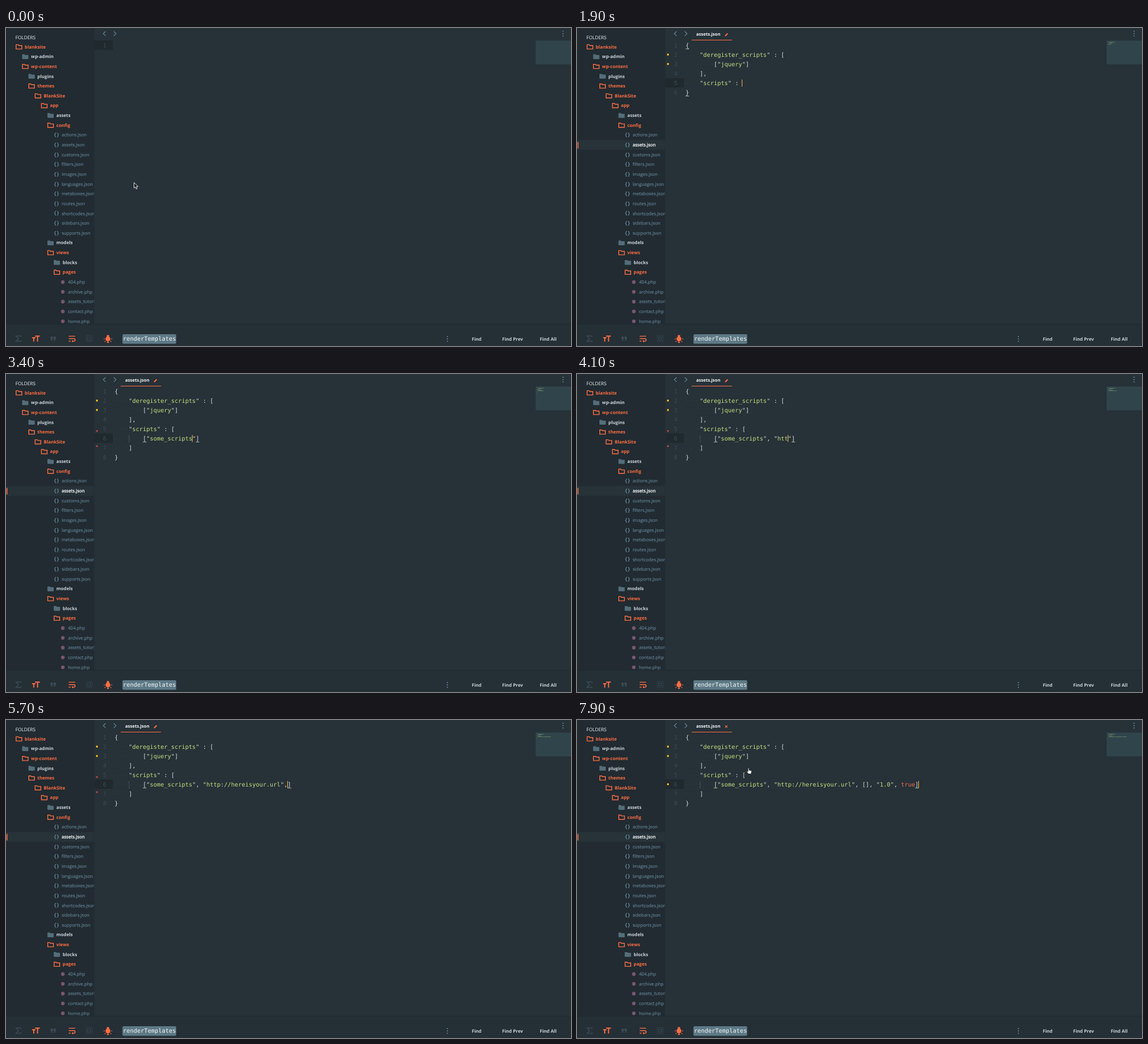
An HTML page that plays this animation: 960 by 540 pixels, repeating every 8000 ms.

```html
<!DOCTYPE html>
<html lang="en">
<head>
<meta charset="utf-8">
<title>Editor typing</title>
<style>
  html, body { margin: 0; width: 100%; height: 100%; overflow: hidden; background: #263138; }
  svg { display: block; width: 960px; height: 540px; }
  text { white-space: pre; text-rendering: geometricPrecision; }
  .ui { font: 7.7px "Open Sans", sans-serif; }
  .bold { font-weight: 700; }
  .code { font: 9.967px "DejaVu Sans Mono", monospace; }
  .brace { font: 700 8.2px "DejaVu Sans Mono", monospace; }
</style>
</head>
<body>
<svg id="stage" viewBox="0 0 960 540" xmlns="http://www.w3.org/2000/svg"></svg>
<script>
const LOOP = 8000, STEP = 100;
const OPEN_AT = 500, CLICK_AT = 750, COMMA_AT = 850, SAVE_AT = 7650;
const ORANGE = '#fc6d43', GREY = '#546e7a', PALE = '#c9d3d8', FILE = '#68899a', BRIGHT = '#f4f7f8';
const CELL = 6, CODE_X = 184.5, LINE = 16, ROW = 16.643;

const stage = document.getElementById('stage');
const clamp = v => Math.max(0, Math.min(1, v));
const rect = (x, y, w, h, fill, more = '') =>
  `<rect x="${x}" y="${y}" width="${w}" height="${h}" fill="${fill}" ${more}/>`;
const path = (d, stroke, width = 1, fill = 'none') =>
  `<path d="${d}" stroke="${stroke}" stroke-width="${width}" fill="${fill}"/>`;
const text = (x, y, s, fill, cls = 'ui', more = '') =>
  `<text x="${x}" y="${y}" fill="${fill}" class="${cls}" ${more}>${s}</text>`;
const at = (x, y, body) => `<g transform="translate(${x} ${y})">${body}</g>`;
const kebab = (x, y) => [-4, 0, 4].map(d =>
  `<circle cx="${x}" cy="${y + d}" r="1.1" fill="#64808d"/>`).join('');

// Tree entries: depth, kind (o open folder, c closed folder, j json, p php), name
const config = 'actions assets customs filters images languages metaboxes routes shortcodes sidebars supports';
const pages = '404 archive assets_tutorial contact home';
const tree = [
  [0, 'o', 'blanksite'], [1, 'c', 'wp-admin'], [1, 'o', 'wp-content'],
  [2, 'c', 'plugins'], [2, 'o', 'themes'], [3, 'o', 'BlankSite'],
  [4, 'o', 'app'], [5, 'c', 'assets'], [5, 'o', 'config'],
  ...config.split(' ').map(n => [6, 'j', n + '.json']),
  [5, 'c', 'models'], [5, 'o', 'views'], [6, 'c', 'blocks'], [6, 'o', 'pages'],
  ...pages.split(' ').map(n => [7, 'p', n + '.php'])
];
const selectedRow = tree.findIndex(e => e[2] === 'assets.json');
const rowY = i => 32 + i * ROW;

function folder(x, y, open) {
  const d = 'M.7 -3.6h3.4l1.3 1.3h4.9v5.9H.7z';
  return at(x, y, open ? path(d, ORANGE, 1.4) : path(d, GREY, 1, GREY));
}

function treeRow([depth, kind, name], i, selected) {
  const y = rowY(i), x = 16.5 + depth * 10.75, isFolder = kind === 'o' || kind === 'c';
  let icon;
  if (isFolder) icon = folder(x, y, kind === 'o');
  else if (kind === 'j') icon = text(x, y + 2.5, '{', FILE, 'brace') + text(x + 4.7, y + 2.5, '}', FILE, 'brace');
  else icon = `<circle cx="${x + 4.8}" cy="${y}" r="3.1" fill="#79566f"/>`;
  const fill = selected ? BRIGHT : kind === 'o' ? ORANGE : kind === 'c' ? PALE : FILE;
  const more = isFolder ? '' : `stroke="${fill}" stroke-width="${selected ? .3 : .1}"`;
  return icon + text(x + (isFolder ? 15.3 : 13.4), y + 2.6, name, fill, isFolder ? 'ui bold' : 'ui', more);
}

function sidebar(opened) {
  const mark = opened
    ? rect(0, rowY(selectedRow) - 8.3, 150, ROW, '#273339') +
      rect(.8, rowY(selectedRow) - 5, 1.6, 11, ORANGE)
    : '';
  return rect(0, 0, 150, 503, '#212b31') +
    `<g clip-path="url(#side)">${mark}` +
    text(16, 19, 'FOLDERS', PALE, 'ui', `style="font-size:8px" stroke="${PALE}" stroke-width=".15"`) +
    tree.map((e, i) => treeRow(e, i, opened && i === selectedRow)).join('') + '</g>';
}

function findPanel() {
  const dim = '#3b4b53';
  return rect(0, 503, 960, 37, '#242f36') + rect(0, 502.5, 960, 1, '#202a30') +
    path('M25.5 524.5v-1.6h-8.5l4.3 4.6-4.3 4.6h8.5v-1.6', dim, 1.5) +
    path('M44.5 526h5.5M47.2 526v6.5M49.5 523.3h8M53.6 523.3v9.2', ORANGE, 1.9) +
    [75.5, 80.7].map(x => path(`M${x} 524h4v4l-1.4 3h-2.2l1.2-3h-1.6z`, 'none', 0, dim)).join('') +
    path('M106.5 523.4h11M106.5 527.5h8.8a2.2 2.2 0 0 1 0 4.4h-3.3M106.5 531.8h3.2', ORANGE, 1.4) +
    path('M114 529.8v4l-2.6-2z', 'none', 0, ORANGE) +
    `<rect x="136" y="522.2" width="10.4" height="10.4" fill="none" stroke="${dim}" stroke-dasharray="1.6 1.1"/>` +
    rect(138.7, 525, 5, 5, 'none', `stroke="${dim}"`) +
    `<circle cx="173.2" cy="528" r="4" fill="${ORANGE}"/>` +
    rect(171.2, 521.5, 4, 4, ORANGE) + rect(171.7, 532.5, 3, 2.3, ORANGE) +
    path('M165.8 528h2.4M178.2 528h2.4M167.5 533l1.6-1.4M178.9 533l-1.6-1.4', ORANGE, 1.2) +
    rect(197.8, 520, 91.4, 16.3, '#5d7985', 'rx="2"') +
    text(198.8, 531.2, 'renderTemplates', '#f4f7f8', 'code') + kebab(750, 528) +
    [[791.5, 'Find'], [843, 'Find Prev'], [907, 'Find All']]
      .map(([x, s]) => text(x, 530.6, s, PALE, 'ui bold')).join('');
}

// Keystrokes: start, end, typed characters, auto-closed remainder after the caret
const line5 = [
  [950, 950, '', ''], [1050, 1050, '"', '"'], [1250, 1600, 'scripts', '"'],
  [1650, 1900, '" : ', ''], [2050, 2050, '[', ']'], [2250, 2250, '', '']
];
const line6 = [
  [2250, 2250, '', ''], [2400, 2400, '[', ']'], [2500, 2500, '"', '"]'],
  [2550, 3400, 'some_scripts', '"]'], [3500, 3750, '", ', ']'], [3850, 3850, '"', '"]'],
  [3900, 4800, 'http://hereis', '"]'], [4850, 5350, 'your.url', '"]'],
  [5500, 5750, '", ', ']'], [5850, 5850, '[', ']]'], [5950, 6300, '], ', ']'],
  [6450, 6450, '"', '"]'], [6650, 6650, '1', '"]'], [6750, 6950, '.0', '"]'],
  [7000, 7200, '", ', ']'], [7250, 7450, 'true', ']'], [7550, 7550, ']', '']
];

function typeLine(keys, indent, t) {
  let before = ' '.repeat(indent), after = '';
  if (t < keys[0][0]) return null;
  for (const [start, end, typed, rest] of keys) {
    if (t < start) break;
    const done = end > start ? clamp((t - start) / (end - start)) : 1;
    before += typed.slice(0, Math.max(1, Math.round(done * typed.length)));
    after = rest;
  }
  return { line: before + after, col: before.length };
}

function documentAt(t) {
  if (t < OPEN_AT) return { lines: [''], row: 0, col: -1 };
  const comma = t >= COMMA_AT ? ',' : '';
  const lines = ['{', '    "deregister_scripts" : [', '        ["jquery"]', '    ]' + comma];
  const fifth = typeLine(line5, 4, t), sixth = typeLine(line6, 8, t);
  let row = t < CLICK_AT ? 0 : 3, col = t < CLICK_AT ? 0 : lines[3].length;
  if (fifth) { lines.push(fifth.line); row = 4; col = fifth.col; }
  if (sixth) { lines.push(sixth.line, '    ]'); row = 5; col = sixth.col; }
  lines.push('}');
  return { lines, row, col };
}

function codeLine(line, i) {
  const y = 32.5 + i * LINE;
  const put = (col, s, fill) => text(CODE_X + col * CELL, y, s, fill, 'code');
  const out = [];
  for (const m of line.matchAll(/"[^"]*"|true|./g)) {
    const s = m[0];
    if (s === ' ') out.push(put(m.index, '·', '#303f46'));
    else if (s[0] === '"' && s.length > 1) out.push(
      put(m.index, '"', '#c5dfc6'), put(m.index + 1, s.slice(1, -1), '#c3e07f'),
      put(m.index + s.length - 1, '"', '#c5dfc6'));
    else out.push(put(m.index, s, s === 'true' ? '#f9694c' : '#d3dde1'));
  }
  return out.join('');
}

function minimap(lines) {
  const words = lines.map((line, i) => [...line.matchAll(/\S+/g)].map(m =>
    rect(901 + m.index * .5, 22.6 + i * 1.15, m[0].length * .5, .65,
      m[0].includes('"') ? '#a9bf7c' : '#b5c2c5', 'opacity=".65"')).join(''));
  return rect(900, 21.3, 60, 40.4, '#30454b') + words.join('');
}

function editor(t) {
  const { lines, row, col } = documentAt(t);
  const bullet = i => rect(153, 43.6 + (i - 1) * LINE, 3, 3, '#fdc013');
  let out = rect(150, 21 + row * LINE, 31.5, LINE, '#1f292e') + minimap(lines);
  lines.forEach((line, i) => {
    out += text(170.8, 32.5 + i * LINE, i + 1, '#3b4b53', 'code', 'text-anchor="end"') + codeLine(line, i);
  });
  if (t < OPEN_AT) return out;

  out += bullet(1) + bullet(2);
  if (row === 5) {
    out += rect(208.7, 104, .8, 12, '#4d5f63');
    out += t < 6000
      ? path('M152.7 95.7h3.8l-1.9 3zM152.7 123.6h3.8l-1.9-3z', 'none', 0, '#ef4f45')
      : bullet(5);
  }
  const underline = (r, c) => rect(CODE_X + c * CELL, 35 + r * LINE, CELL, .9, '#b9c7a9');
  if (row === 5 && lines[5].includes('['))
    out += underline(5, 8) + underline(5, lines[5].lastIndexOf(']'));
  else out += underline(0, 0) + underline(lines.length - 1, 0);
  return out + rect(CODE_X + col * CELL - .5, 23.5 + row * LINE, 1, 12, '#ffb237');
}

function tab(t) {
  if (t < OPEN_AT) return '';
  const dirty = t >= COMMA_AT && t < SAVE_AT;
  return text(202.5, 13.4, 'assets.json', BRIGHT, 'ui bold', 'style="font-size:7.5px"') +
    rect(194.8, 20, 68.6, 1, ORANGE) +
    (dirty
      ? path('M251.2 14.2l.5-1.9 3.7-3.7 1.4 1.4-3.7 3.7z', 'none', 0, ORANGE)
      : path('M251.6 9.1l4 4M255.6 9.1l-4 4', ORANGE, 1.1));
}

const arrow = path('M0 0v9.3l2.2-2 1.6 3.7 1.7-.8-1.6-3.5h3z', '#f2f2f2', .9, '#10161a');
const hand = path('M-1.2 .2C-1.2-.9 .4-.9 .5 .2L.8 3.2 4.2 3.9C5.2 4.2 5.3 5 5.1 6L4.4 9.5H-.3L-2.8 6.2C-3.4 5.2-2.4 4.6-1.7 5.2L-.9 5.9z',
  '#12181b', .7, '#f4f4f4');

// Pointer legs: start, end, from, to, shape
const legs = [
  [0, 400, 217.5, 262.5, 116, 197, arrow],
  [400, 600, 116, 197, 116, 197, arrow],
  [600, 750, 116, 197, 224, 78, arrow],
  [750, 850, 224, 78, 224, 78, arrow],
  [7700, 7900, 228, 79, 291.5, 82, hand],
  [7900, 8000, 291.5, 82, 291.5, 82, hand]
];

function pointer(t) {
  const leg = legs.find(([a, b]) => t >= a && t < b);
  if (!leg) return '';
  const [a, b, x0, y0, x1, y1, shape] = leg;
  const p = clamp((t - a) / (b - a)), e = p * p * (3 - 2 * p);
  return at(x0 + (x1 - x0) * e, y0 + (y1 - y0) * e, shape);
}

const backdrop = '<clipPath id="side"><rect width="149.5" height="503"/></clipPath>' +
  rect(0, 0, 960, 540, '#263138');
const chrome = path('M169.3 5.8l-4 3.8 4 3.8M183 5.8l4 3.8-4 3.8', '#64808d', 1.3) +
  kebab(946.5, 9.5) + findPanel();

let shown = -1;
function frame() {
  const t = Math.floor(performance.now() % LOOP / STEP) * STEP;
  if (t !== shown) {
    shown = t;
    stage.innerHTML = backdrop + sidebar(t >= OPEN_AT) + chrome + tab(t) + editor(t) + pointer(t);
  }
  requestAnimationFrame(frame);
}
frame();
</script>
</body>
</html>
```
